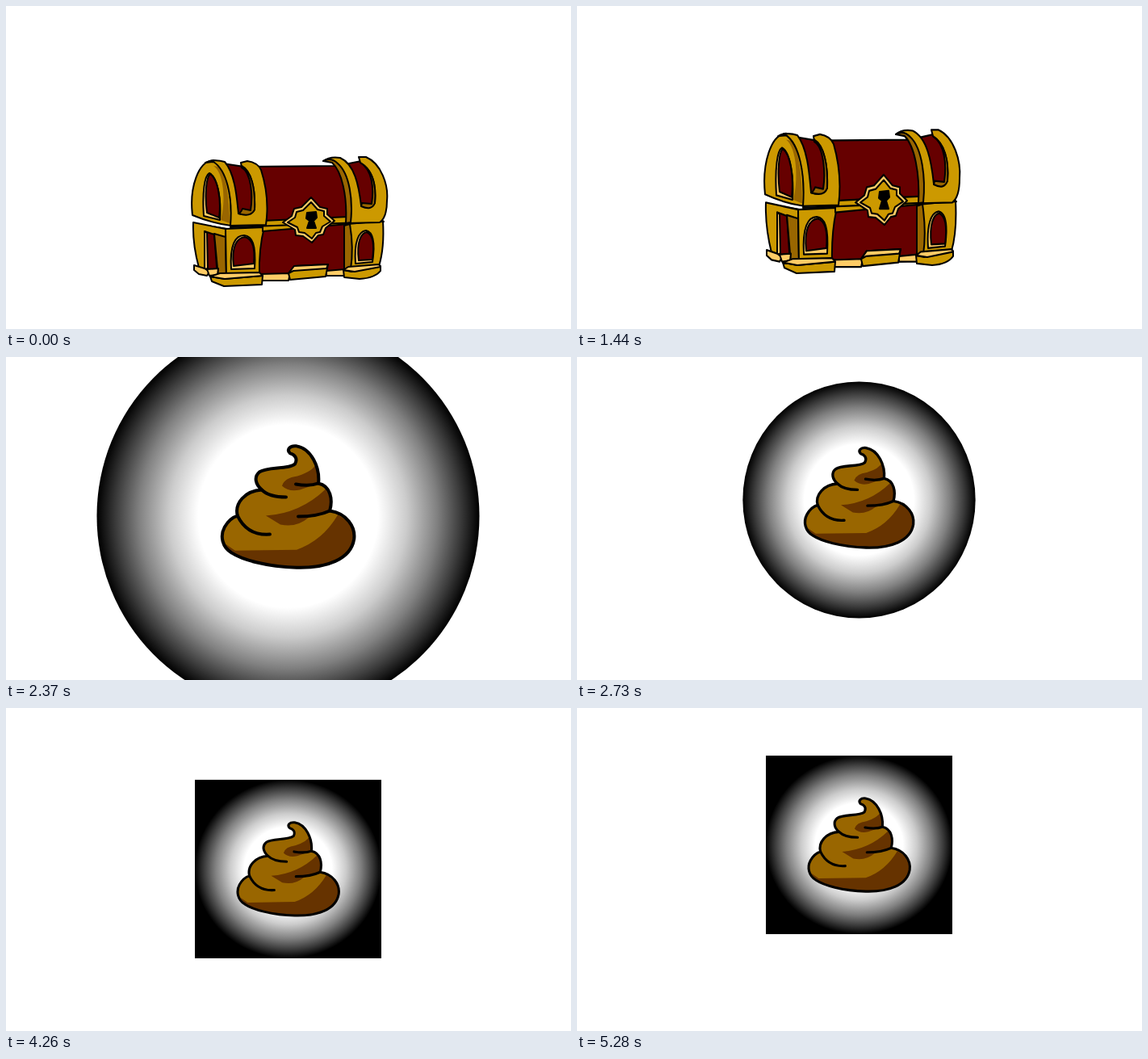
An HTML page for the animation above (5310 ms loop, 700 by 400 pixels).

```html
<!DOCTYPE html>
<html lang="en">
<head>
<meta charset="utf-8">
<title>Treasure chest</title>
<style>
html, body { margin: 0; width: 100%; height: 100%; overflow: hidden; background: #fff; }
svg { display: block; width: 100vw; height: 100vh; }
#chest { stroke: #000; stroke-width: 2; stroke-linejoin: round; stroke-linecap: round; }
.gold { fill: #c90; }
.dark { fill: #960; }
.light { fill: #fc6; }
.red { fill: #600; }
.flat { stroke: none; }
.ink { fill: none; stroke: #000; stroke-width: 4; stroke-linecap: round; stroke-linejoin: round; }
</style>
</head>
<body>
<svg viewBox="0 0 700 400">
  <defs>
    <radialGradient id="shine">
      <stop offset=".47" stop-color="#fff"/>
      <stop offset=".62" stop-color="#ccc"/>
      <stop offset=".78" stop-color="#808080"/>
      <stop offset=".9" stop-color="#3c3c3c"/>
      <stop offset="1" stop-color="#000"/>
    </radialGradient>
  </defs>

  <g id="chest">
    <!-- base -->
    <path class="red" d="M236 270L274 276L466 268L462 325L417 333L318 338L262 340L240 325Z"/>
    <path class="gold" d="M232 268L272 276L273 338L262 336L258 283L246 279L247 326L239 324Q231 295 232 268Z"/>
    <path class="dark" d="M258 282L272 286L273 336L263 336Z"/>
    <path class="light" d="M246 279L249 281L250 325L246 326Z"/>
    <path class="gold" d="M272 276L320 274Q313 300 314 335L273 338Z"/>
    <path class="light" d="M279 326C277 296 284 284 295 284C305 285 310 295 308 325Z"/>
    <path class="red" d="M282 322C279 298 286 287 296 286C304 288 309 298 307 319Z"/>
    <path class="light" d="M233 321L246 325L252 329L249 334L239 332L233 327Z"/>
    <path class="light" d="M249 326L263 325L262 333L252 334Z"/>
    <path class="light" d="M314 332L352 331L350 340L316 340Z"/>
    <path class="light" d="M397 328L420 326L419 334L397 334Z"/>
    <path class="gold" d="M253 335L271 338L318 334L317 345L270 347L255 341Z"/>
    <path class="light" d="M253 335L265 331L314 330L318 334L271 338Z"/>
    <path class="gold" d="M350 331L357 322L399 320L396 335L352 339Z"/>
    <path class="light" d="M350 331L357 322L399 320L397 325L356 328Z"/>
    <path class="gold" d="M424 270L467 266Q469 300 462 322L424 326Q420 300 424 270Z"/>
    <path class="dark" d="M419 272L426 270Q431 300 427 326L419 327Z"/>
    <path class="light" d="M433 319C431 292 437 279 446 278C456 280 457 297 454 317Z"/>
    <path class="red" d="M437 315C434 292 440 281 447 280C456 284 456 300 454 314Z"/>
    <path class="gold" d="M418 327L428 329L464 322L464 328Q457 337 438 338L419 336Z"/>
    <path class="light" d="M418 327L424 323L462 320L464 323L432 329Z"/>

    <!-- lid -->
    <path class="red" d="M262 194L295 199L410 198L440 192L466 225L465 266L278 272Z"/>
    <path class="gold" d="M318 266L424 261L424 270L318 279Z"/>
    <path d="M278 274L468 267" fill="none"/>
    <path class="gold" d="M231 259C227 225 238 192 257 191C272 193 280 226 279 272Q255 269 231 259Z"/>
    <path class="dark flat" d="M257 198C271 207 272 245 266 265L277 269C277 240 273 207 263 199Z"/>
    <path class="light" d="M245 260C243 230 246 210 252 207C261 211 267 235 265 265Z"/>
    <path class="red" d="M249 256C246 234 248 212 253 208C262 214 267 238 264 262Z"/>
    <path class="gold" d="M247 194Q258 189 271 193C284 208 286 238 288 257Q303 261 308 252C309 226 304 204 292 200L291 194L299 192Q312 194 316 203C323 225 325 250 322 271L278 272C281 235 273 203 257 193Z"/>
    <path class="dark" d="M292 200C304 207 306 235 303 253L293 251Q291 256 288 257Q304 262 308 252C309 226 304 204 292 198Z"/>
    <path class="gold" d="M393 192Q401 186 414 188C432 196 437 222 440 247Q449 253 457 244C459 220 453 202 439 194L437 187L446 187C465 195 474 222 472 241Q472 262 463 268L422 269C426 235 417 202 404 192Z"/>
    <path class="dark" d="M393 192Q403 187 411 195C426 208 430 241 427 268L421 269C423 235 416 205 404 194Z"/>
    <path class="dark" d="M439 194C454 203 456 226 453 245L441 244L440 248Q453 254 457 244C459 220 453 202 439 194Z"/>

    <!-- lock -->
    <path class="light" d="M378 237L389 249L398 251L398 258L407 266L396 275L393 283L387 284L379 293L368 285L359 284L358 277L343 268L354 260L357 251L366 249Z"/>
    <path class="gold" d="M378 243L386 252L394 254L394 260L402 267L392 273L389 280L384 281L379 288L370 281L363 280L361 274L349 268L358 262L360 255L368 253Z"/>
    <path d="M373 256L384 255L385 262L381 266L384 275L373 275L376 266L372 263Z"/>
  </g>

  <rect id="glow" fill="url(#shine)"/>

  <g id="swirl">
    <path id="body" fill="#960" d="M352 120C347 115 352 110 360 111C378 114 389 137 387 157C402 160 405 177 401 191C422 194 433 211 431 226C427 251 397 262 360 261C322 260 292 251 280 243C268 236 265 222 271 211C275 204 280 199 287 197C283 182 296 166 317 165C309 158 307 149 314 143C323 136 350 140 358 133C362 126 357 121 352 120Z"/>
    <g fill="#630">
      <path d="M271 231L284 240L360 239Q392 228 411 196Q432 206 431 226C427 251 397 262 360 261C322 260 292 251 280 243Z"/>
      <path d="M322 197Q365 194 396 164Q405 175 401 191L374 200Q360 212 340 208Z"/>
      <path d="M342 160Q345 150 361 148Q380 142 384 133L387 157L364 165Q350 168 342 160Z"/>
    </g>
    <path class="ink" d="M317 165Q326 174 347 174M387 157Q376 161 359 158M401 191Q386 198 362 198M287 197Q299 222 327 220"/>
    <path id="line" class="ink"/>
  </g>
</svg>
<script>
const LOOP = 5310, STEP = 30;
const GROW = 1890, PEAK = 2280, SETTLE = 3070, LOW = 4290;
const $ = id => document.getElementById(id);
const chest = $('chest'), glow = $('glow'), swirl = $('swirl');
$('line').setAttribute('d', $('body').getAttribute('d'));

// Chest poses: time, shift x, shift of the foot, vertical stretch
const poses = [
  [0, 0, 0, 1], [30, 6, 2, 1.05], [60, 11, 7, 1], [150, -22, -12, 1.07], [210, 5, 3, .98], [270, 0, 0, 1],
  [600, 0, 0, 1], [630, 6, 2, 1.07], [690, 11, 7, 1], [780, -38, -21, 1.11], [840, 5, 4, .98], [900, 0, 0, 1],
  [1140, 0, 0, 1], [1170, 6, 2, 1.07], [1230, 11, 6, 1], [1320, -38, -21, 1.11], [1440, 2, -16, 1.11],
  [1530, 23, -31, 1.15], [1620, -30, 5, .98], [1710, 15, -20, 1.1], [1800, -20, 4, 1], [1890, 0, 0, 1], [LOOP, 0, 0, 1]
];

const mix = (a, b, u) => a + (b - a) * u;

function poseAt(t) {
  const i = poses.findIndex(p => p[0] > t), a = poses[i - 1], b = poses[i];
  const u = (t - a[0]) / (b[0] - a[0]);
  return a.map((v, k) => mix(v, b[k], u));
}

function drawChest(t) {
  const [, dx, dy, sy] = poseAt(t);
  chest.setAttribute('transform', `translate(${dx} ${347 + dy}) scale(1 ${sy}) translate(0 -347)`);
}

function drawPrize(t) {
  const top = 2.34;
  let g, size, glowY, y;
  if (t < PEAK) {
    const u = ((t - GROW) / (PEAK - GROW)) ** 1.1;
    g = top * u;
    size = 1.39 * u;
    glowY = mix(265, 204, u);
    y = mix(265, 189, u);
  } else {
    const left = Math.max(0, (SETTLE - t) / (SETTLE - PEAK));
    g = 1 + (top - 1) * left * left;
    size = 1 + .29 * (g - 1);
    const phase = Math.min(1, Math.abs(t - LOW) / 990) * Math.PI;
    const high = t < LOW ? 170.8 : 169.5;
    const rest = mix(high, 199.5, ((1 + Math.cos(phase)) / 2) ** 1.3);
    glowY = rest + 25 * (g - 1);
    y = rest + 14 * (g - 1);
  }
  const rx = 115.5 * g;
  const ry = rx * (.957 + Math.min(.06, Math.max(0, g - 1) * .25));
  const round = t < SETTLE;
  const box = {
    x: 349.5 - rx, y: glowY - ry, width: 2 * rx, height: 2 * ry,
    rx: round ? rx : 0, ry: round ? ry : 0
  };
  for (const k in box) glow.setAttribute(k, box[k]);
  swirl.setAttribute('transform', `translate(350 ${y}) scale(${size * .768}) translate(-350 -186)`);
}

function draw(now) {
  const t = Math.floor(now % LOOP / STEP) * STEP;
  const open = t > GROW;
  chest.style.display = t < 2130 ? '' : 'none';
  glow.style.display = swirl.style.display = open ? '' : 'none';
  drawChest(t);
  if (open) drawPrize(t);
}

let start;
function tick(now) {
  start ??= now;
  draw(now - start);
  requestAnimationFrame(tick);
}
draw(0);
requestAnimationFrame(tick);
</script>
</body>
</html>
```
